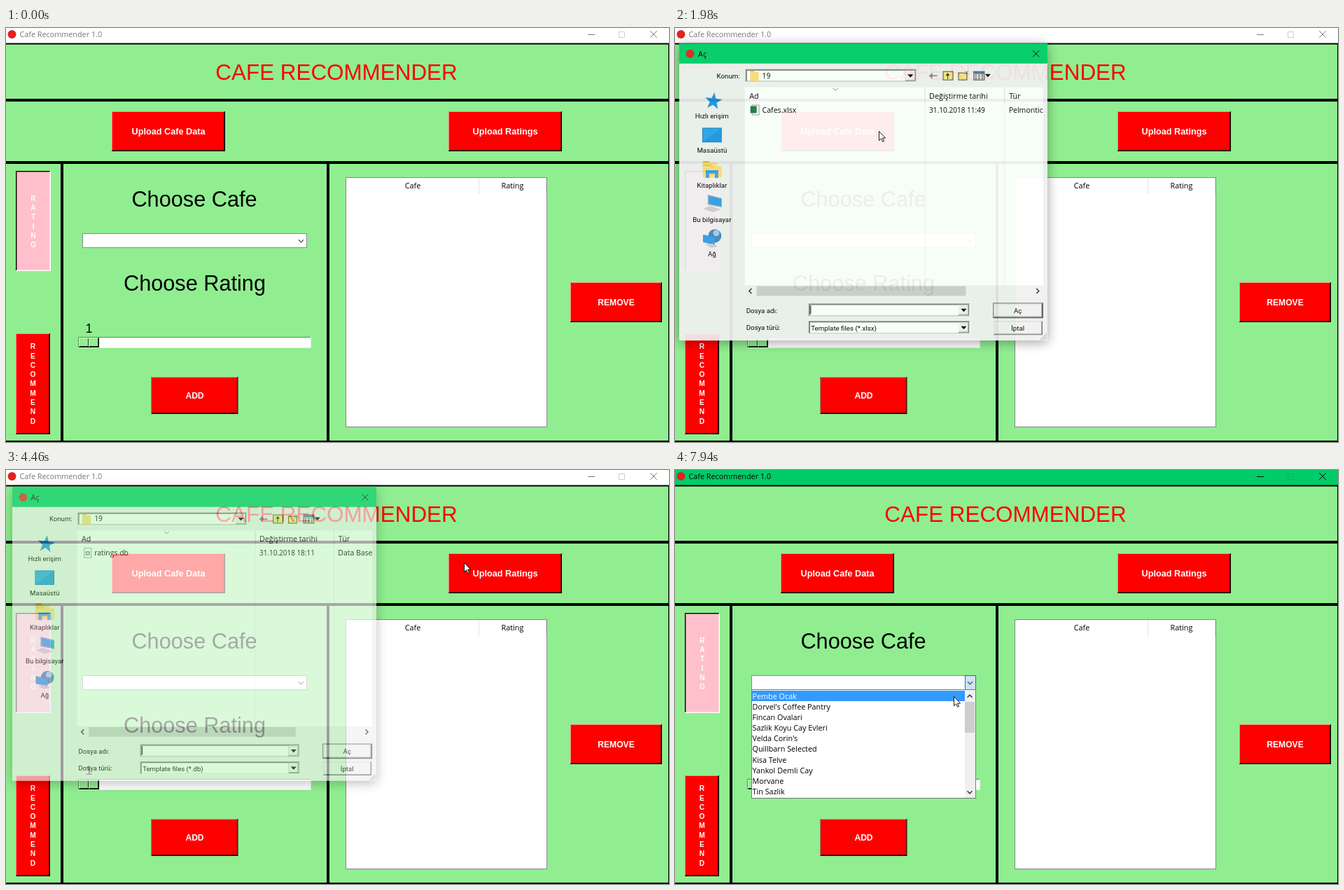
An HTML page with a canvas that plays this animation: 947 by 591 pixels, repeating every 8 s.

```html
<!DOCTYPE html>
<html lang="en">
<head>
<meta charset="utf-8">
<title>Cafe Recommender</title>
<style>
html, body { margin: 0; width: 100%; height: 100%; overflow: hidden; background: #90ee90; }
canvas { display: block; }
</style>
</head>
<body>
<canvas id="stage" width="947" height="591"></canvas>
<script>
const W = 947, H = 591, LOOP = 8000;
const ARIAL = '"Liberation Sans", Arial, sans-serif';
const UI = '"Open Sans", "Noto Sans", sans-serif';
const SMALL = 'Roboto, "Open Sans", sans-serif';
const GREEN = '#90ee90', ACCENT = '#00cc6a', RED = '#ff0000', FACE = '#f0f0f0';

const main = document.getElementById('stage').getContext('2d');
const layer = document.createElement('canvas');
layer.width = W;
layer.height = H;
const sheet = layer.getContext('2d');
let g = main;

// ---- drawing helpers ----
function rect(x, y, w, h, color) {
  g.fillStyle = color;
  g.fillRect(x, y, w, h);
}

function box(x, y, w, h, border, fill) {
  rect(x, y, w, h, border);
  rect(x + 1, y + 1, w - 2, h - 2, fill);
}

function text(str, x, y, size, color = '#000', font = UI, align = 'left', weight = 400) {
  g.font = `${weight} ${size}px ${font}`;
  g.textAlign = align;
  g.fillStyle = color;
  g.fillText(str, x, y);
}

function poly(points, fill) {
  g.beginPath();
  points.forEach(([x, y]) => g.lineTo(x, y));
  g.closePath();
  g.fillStyle = fill;
  g.fill();
}

function line(points, color, width = 1) {
  g.beginPath();
  points.forEach(([x, y]) => g.lineTo(x, y));
  g.strokeStyle = color;
  g.lineWidth = width;
  g.stroke();
}

function disc(x, y, r, color) {
  g.beginPath();
  g.arc(x, y, r, 0, 7);
  g.fillStyle = color;
  g.fill();
}

function cross(x, y, r, color) {
  line([[x - r, y - r], [x + r, y + r]], color);
  line([[x - r, y + r], [x + r, y - r]], color);
}

function chevron(x, y, dx, dy, color, width = 1.2) {
  const tip = dx ? [[x - dx, y - 3.5], [x + dx, y], [x - dx, y + 3.5]]
                 : [[x - 3.5, y - dy], [x, y + dy], [x + 3.5, y - dy]];
  line(tip, color, width);
}

function triangle(x, y) {
  poly([[x - 4, y - 2], [x + 4, y - 2], [x, y + 2.5]], '#000');
}

// two-pixel bevel: outer and inner tones for the lit and shaded sides
function bevel(x, y, w, h, fill, lit, litIn, shade, shadeIn) {
  rect(x, y, w, h, shade);
  rect(x, y, w - 1, h - 1, lit);
  rect(x + 1, y + 1, w - 2, h - 2, shadeIn);
  rect(x + 1, y + 1, w - 3, h - 3, litIn);
  rect(x + 2, y + 2, w - 4, h - 4, fill);
}

// ---- timing helpers ----
const between = (t, a, b) => t >= a && t < b;

// progress that advances in n held steps, the first at t0 and the last at t1
function stepped(t, t0, t1, n) {
  if (t < t0) return 0;
  if (n === 1) return 1;
  const k = Math.floor((t - t0) / (t1 - t0) * (n - 1) + 1e-6) + 1;
  return Math.min(k / n, 1);
}

// start, end, steps, target x, target y
const MOVES = [
  [577, 1270, 10, 280, 159],
  [1430, 1580, 3, 291, 147],
  [2210, 2610, 6, 173, 119],
  [3220, 3840, 9, 654, 132],
  [4690, 4920, 4, 430, 150],
  [5000, 5370, 6, 283, 109],
  [5540, 5540, 1, 294, 115],
  [5690, 5690, 1, 294, 121],
  [6080, 6540, 7, 490, 286],
  [6690, 7080, 6, 423, 301],
  [7550, 7620, 2, 398, 320],
  [7850, 7940, 2, 398, 323]
];

function pointerAt(t) {
  let x = 497, y = 530;
  for (const [t0, t1, n, tx, ty] of MOVES) {
    const p = stepped(t, t0, t1, n), e = p * p * (3 - 2 * p);
    x += (tx - x) * e;
    y += (ty - y) * e;
    if (p < 1) break;
  }
  return { x: Math.round(x), y: Math.round(y) };
}

// ---- main window ----
const CAFES = ['Pembe Ocak', "Dorvel's Coffee Pantry", 'Fincan Ovalari', 'Sazlik Koyu Cay Evleri',
  "Velda Corin's", 'Quillbarn Selected', 'Kisa Telve', 'Yankol Demli Cay', 'Morvane', 'Tin Sazlik'];

function button(label, x, y, w, h, size, pressed) {
  if (pressed) bevel(x, y, w, h, RED, '#000', '#990000', '#ff7f7f', RED);
  else bevel(x, y, w, h, RED, '#ff7f7f', RED, '#000', '#500000');
  const d = pressed ? 1 : 0;
  text(label, x + w / 2 + d, y + h / 2 + size * 0.36 + d, size, '#fff', ARIAL, 'center', 700);
}

function column(word, x, y) {
  [...word].forEach((ch, i) => text(ch, x, y + i * 13.3, 10.2, '#fff', ARIAL, 'center', 700));
}

function titleBar(active) {
  const ink = active ? '#000' : '#777';
  rect(0, 0, W, 22, active ? ACCENT : '#fff');
  disc(8.5, 9, 6, '#e3231b');
  text('Cafe Recommender 1.0', 19.5, 13, 10.8, ink);
  rect(831, 9, 10, 1, ink);
  g.strokeStyle = active ? '#22a765' : '#d0d0d0';
  g.lineWidth = 1;
  g.strokeRect(875.5, 5.5, 8, 8);
  cross(925, 9, 4.7, ink);
}

function comboBox(hover, open) {
  box(109, 293, 321, 21, hover && !open ? '#171717' : '#8a8a8a', '#fff');
  if (open) box(414, 293, 16, 21, '#0078d7', '#cce4f7');
  else if (hover) box(414, 293, 16, 21, '#0078d7', '#e5f1fb');
  chevron(421.5, 304, 0, 1.9, '#444');
}

function dropList() {
  box(109, 313, 321, 156, '#777', '#fff');
  rect(110, 315, 304, 15, '#3399ff');
  CAFES.forEach((name, i) => text(name, 110.5, 326.5 + i * 15.18, 10.8, i ? '#000' : '#fff'));
  rect(414, 314, 15, 154, FACE);
  rect(414, 331, 14, 44, '#cdcdcd');
  chevron(421, 323, 0, -1.8, '#404040', 1.6);
  chevron(421, 460, 0, 1.8, '#404040', 1.6);
}

function mainWindow(t, pointer) {
  rect(0, 0, W, H, GREEN);
  titleBar(between(t, 1350, 1660) || between(t, 3070, 4300) || t >= 5920);

  rect(0, 21.5, W, 2, '#000');
  rect(0, 101, W, 4, '#000');
  rect(0, 190, W, 4, '#000');
  rect(78, 192, 4, 398, '#000');
  rect(458, 192, 4, 398, '#000');
  rect(0, 589, W, 2, '#000');
  rect(946, 22, 1, 569, '#000');

  text('CAFE RECOMMENDER', 472, 73.5, 31.4, RED, ARIAL, 'center');
  text('Choose Cafe', 269, 255, 30.7, '#000', ARIAL, 'center');
  text('Choose Rating', 269.5, 374.5, 30.7, '#000', ARIAL, 'center');

  button('Upload Cafe Data', 151, 119, 162, 57, 12.7, between(t, 1350, 1510));
  button('Upload Ratings', 632, 119, 162, 57, 12.7, between(t, 4140, 4300));
  button('REMOVE', 806, 363, 131, 57, 12.1);
  button('ADD', 207.5, 498, 124, 53, 12.1);
  button('', 14, 436, 49, 144, 10);
  column('RECOMMEND', 38.5, 458.2);
  bevel(14, 204, 50, 143, '#ffc0cb', '#000', '#99737a', '#fff', '#ffe0e5');
  column('RATING', 39, 246.8);

  text('1', 118.5, 435, 17.9, '#000', ARIAL, 'center');
  bevel(103, 441, 333, 16, '#fff', '#568e56', '#fff', '#d8f8d8', '#fff');
  bevel(104, 442, 29, 14, GREEN, '#d8f8d8', GREEN, '#000', '#203820');
  rect(117, 443, 1, 12, '#203820');
  rect(118, 443, 1, 12, '#d8f8d8');

  box(485, 213, 288, 357, '#828790', '#fff');
  rect(675, 214, 1, 23, '#e2e2e2');
  rect(771, 214, 1, 23, '#e2e2e2');
  text('Cafe', 581, 229, 10.8, '#000', UI, 'center');
  text('Rating', 723.5, 229, 10.8, '#000', UI, 'center');

  const open = t >= 7160;
  const hover = pointer && between(pointer.x, 109, 430) && between(pointer.y, 293, 314);
  comboBox(hover, open);
  if (open) dropList();
}

// ---- file dialog ----
const DIALOGS = [
  { open: 1830, pick: 2760, shut: 3070, file: 'Cafes.xlsx', date: '31.10.2018 11:49', kind: 'Pelmontic', filter: '*.xlsx' },
  { open: 4380, pick: 5690, shut: 5920, file: 'ratings.db', date: '31.10.2018 18:11', kind: 'Data Base', filter: '*.db' }
];
const FADE_IN = [[0.3, 0.965], [0.66, 0.985], [0.93, 0.996]];
const FADE_OUT = [[0.6, 0.985], [0.2, 0.964]];

// [opacity, scale]
function dialogPose(d, t) {
  if (t < d.open) return null;
  if (t >= d.shut) return FADE_OUT[Math.floor((t - d.shut) / 70)];
  return FADE_IN[Math.floor((t - d.open) / 75)] || [1, 1];
}

function field(x, y, w, arrow) {
  bevel(x, y, w, 19, '#fff', '#888', '#555', '#fff', '#e3e3e3');
  if (!arrow) return;
  bevel(x + w - 17, y + 2, 15, 15, FACE, '#fff', FACE, '#777', '#b5b5b5');
  triangle(x + w - 9.5, y + 9.5);
}

function dialogButton(label, y, main) {
  if (main) rect(455, y, 72, 22, '#555');
  bevel(456, y + 1, 70, 20, FACE, '#fff', FACE, '#696969', '#a0a0a0');
  text(label, 490.5, y + 14.5, 9.75, '#000', SMALL, 'center');
}

function folder(x, y, w, h) {
  rect(x, y, w * 0.45, h, '#e8bd4c');
  rect(x, y + 2, w, h - 2, '#ffdc78');
}

function monitor(x, y) {
  poly([[x - 7, y - 12], [x + 13, y - 7], [x + 13, y + 6], [x - 7, y + 2]], '#7fa9c4');
  poly([[x - 5.5, y - 10], [x + 12, y - 6], [x + 12, y + 4.5], [x - 5.5, y + 0.5]], '#2c9fe6');
  poly([[x - 14, y + 8], [x - 4, y + 4], [x + 12, y + 9], [x, y + 13]], '#c9ced2');
}

function sidebar() {
  const star = [];
  for (let i = 0; i < 10; i++) {
    const r = i % 2 ? 5.2 : 13, a = i * Math.PI / 5 - 1.45;
    star.push([54 + r * Math.cos(a), 104 + r * Math.sin(a)]);
  }
  poly(star, '#2590dc');

  box(38, 142, 28, 21, '#1878bd', '#2aa1ee');
  poly([[39, 162], [65, 143], [65, 162]], '#1e93e4');

  folder(39, 190, 20, 14);
  folder(39, 195, 27, 18);
  poly([[43, 214], [43, 203], [61, 203], [61, 214], [56, 214], [56, 208], [48, 208], [48, 214]], '#39a4e0');

  monitor(53, 250);

  disc(56, 297, 9.5, '#3f86bd');
  disc(58, 293, 4.5, '#9ccbe6');
  poly([[39, 295], [56, 299], [56, 310], [39, 306]], '#2c9fe6');
  poly([[42, 309], [52, 308], [61, 312], [51, 314]], '#c9ced2');

  ['Hızlı erişim', 'Masaüstü', 'Kitaplıklar', 'Bu bilgisayar', 'Ağ'].forEach((label, i) =>
    text(label, 52, 128.7 + i * 49.4, 9.75, '#000', SMALL, 'center'));
}

function toolbar() {
  line([[364, 67.5], [375, 67.5]], '#8a8f94', 2);
  poly([[363, 67.5], [368, 63], [368, 72]], '#8a8f94');

  box(383, 61, 15, 13, '#50481c', '#f4e48a');
  line([[390, 72], [390, 65]], '#222');
  poly([[387, 67], [390, 63.5], [393, 67]], '#222');

  box(405, 63, 13, 11, '#50481c', '#f4e48a');
  cross(417, 63, 2.5, '#806c20');

  box(427, 61, 16, 13, '#333', '#fff');
  rect(428, 62, 14, 3, '#4774a8');
  for (let i = 0; i < 9; i++) rect(429 + i % 3 * 4.5, 66 + Math.floor(i / 3) * 2.5, 3, 1.2, '#333');
  triangle(447.5, 67);
}

function fileIcon(d) {
  box(109, 109, 11, 15, '#9a9a9a', '#fff');
  if (d === DIALOGS[0]) rect(107, 111, 9, 10, '#217346');
  else {
    disc(114.5, 117, 3.4, '#8e9aa3');
    disc(114.5, 117, 1.4, '#fff');
  }
}

function fileList(d, hover, picked) {
  rect(99, 84, 428, 300, '#fff');
  for (const x of [357, 471]) {
    rect(x, 84, 1, 284, '#f2f2f2');
    rect(x, 84, 1, 22, '#e0e0e0');
  }
  chevron(229, 87, 0, 1.5, '#888', 1);
  text('Ad', 105.5, 100, 10.8);
  text('Değiştirme tarihi', 363.5, 100, 10.8);
  text('Tür', 478, 100, 10.8);

  if (picked) box(103, 107, 424, 18, '#99d1ff', '#cce8ff');
  else if (hover) rect(103, 107, 424, 18, '#e5f3ff');
  fileIcon(d);
  text(d.file, 124, 120.3, 10.6);
  text(d.date, 363.5, 120.3, 10.1);
  text(d.kind, 477.5, 120.3, 10.6);

  rect(99, 368, 428, 16, FACE);
  rect(116, 369, 300, 14, '#cdcdcd');
  chevron(107, 376, -1.8, 0, '#404040', 1.6);
  chevron(519, 376, 1.8, 0, '#404040', 1.6);
}

function dialogBody(d, t, pointer) {
  g.shadowColor = 'rgba(0,0,0,.4)';
  g.shadowBlur = 16;
  g.shadowOffsetY = 3;
  rect(5, 21, 528, 426, FACE);
  g.shadowColor = 'transparent';

  rect(5, 21, 528, 29, ACCENT);
  disc(20.5, 36, 6, '#e3231b');
  text('Aç', 32, 40, 11);
  cross(516.5, 36, 4.5, '#000');

  text('Konum:', 92, 71, 9.75, '#000', SMALL, 'right');
  field(100, 58, 246, true);
  folder(107, 60, 12, 15);
  text('19', 124, 71, 10.4);
  toolbar();
  sidebar();

  const picked = t >= d.pick;
  fileList(d, pointer.x < 527 && between(pointer.y, 107, 126), picked);

  text('Dosya adı:', 101, 407.5, 9.75, '#000', SMALL);
  text('Dosya türü:', 101, 432, 9.75, '#000', SMALL);
  field(190.5, 394, 232, true);
  field(190.5, 419, 232, true);
  if (picked) text(d.file, 193, 408, 9.75, '#000', SMALL);
  else if (t < d.open + 650) rect(193, 397, 1, 12, '#000');
  text(`Template files (${d.filter})`, 194, 432.7, 9.75, '#000', SMALL);
  dialogButton('Aç', 393, true);
  dialogButton('İptal', 418, false);
  for (const r of [3, 6, 9]) line([[532 - r, 446], [532, 446 - r]], '#a0a0a0');
}

function dialog(d, t, pointer) {
  const pose = dialogPose(d, t);
  if (!pose) return;
  const [alpha, scale] = pose, cx = 269, cy = 234;
  g = sheet;
  g.setTransform(1, 0, 0, 1, 0, 0);
  g.clearRect(0, 0, W, H);
  g.setTransform(scale, 0, 0, scale, cx * (1 - scale), cy * (1 - scale));
  dialogBody(d, t, pointer);
  g = main;
  g.globalAlpha = alpha;
  g.drawImage(layer, 0, 0);
  g.globalAlpha = 1;
}

// ---- mouse pointer ----
const ARROW = [[0, 0], [0, 16], [3.7, 12.6], [6.2, 18], [8.6, 17], [6.2, 11.7], [11, 11.7]];

function arrow({ x, y }) {
  const shape = ARROW.map(([px, py]) => [x + 0.5 + px * 0.82, y + 0.5 + py * 0.82]);
  poly(shape, '#fff');
  line([...shape, shape[0]], '#000', 0.9);
}

function draw() {
  const t = performance.now() % LOOP;
  const pointer = t < 500 ? null : pointerAt(t);
  mainWindow(t, pointer);
  DIALOGS.forEach(d => dialog(d, t, pointer));
  if (pointer) arrow(pointer);
  requestAnimationFrame(draw);
}
draw();
</script>
</body>
</html>
```
